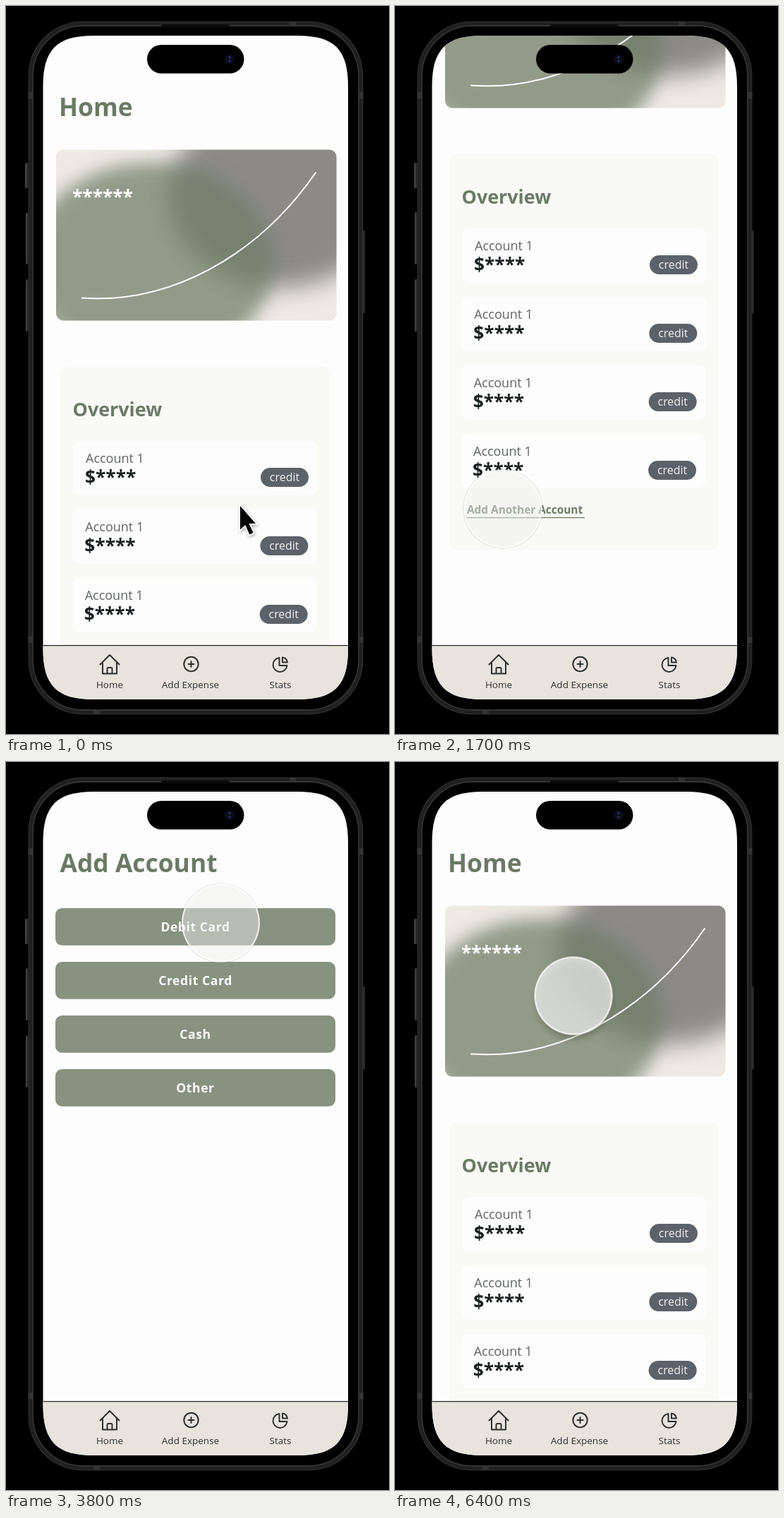
An HTML page for the animation above (6.5 s loop, 543 by 1031 pixels).

```html
<!DOCTYPE html>
<html lang="en">
<head>
<meta charset="utf-8">
<title>Budget app walkthrough</title>
<style>
  html, body { margin: 0; width: 100%; height: 100%; overflow: hidden; background: #000; }
  #stage { position: relative; width: 543px; height: 1031px; overflow: hidden; }
  svg { position: absolute; left: 0; top: 0; font-family: "Open Sans", "Noto Sans", sans-serif; }
  svg, .touch { --loop: 6.5s; }

  .title { font-size: 35.4px; font-weight: 700; fill: #6b7a66; }
  .heading { font-size: 26.9px; font-weight: 700; fill: #6b7a66; }
  .stars { font-size: 26.3px; font-weight: 700; }
  .name { font-size: 18px; fill: #606263; }
  .tag { font-size: 16px; fill: #f0f0f0; text-anchor: middle; }
  .link { font-size: 15.4px; font-weight: 700; fill: #6b7a66; }
  .option { font-size: 17.5px; font-weight: 700; letter-spacing: .6px; fill: #fdfdfd; text-anchor: middle; }
  .nav text { font-size: 13.5px; fill: #2f302f; text-anchor: middle; }
  .icon { fill: none; stroke: #2f302f; stroke-width: 2; stroke-linecap: round; stroke-linejoin: round; }

  .scroll { animation: scroll var(--loop) infinite; }
  .home { animation: home var(--loop) step-end infinite; }
  .add { animation: add var(--loop) step-end infinite; }
  .arrow { animation: arrow var(--loop) step-end infinite; }
  .touch {
    position: absolute; left: -55.5px; top: -55.5px; width: 111px; height: 111px;
    box-sizing: border-box; border: 2px solid rgba(255,255,255,.85); border-radius: 50%;
    animation: path var(--loop) infinite, press var(--loop) infinite, show var(--loop) step-end infinite;
  }

  @keyframes scroll {
    0%, 1.54% { transform: none; animation-timing-function: ease-in-out; }
    14.95%, 84.6% { transform: translateY(-301px); animation-timing-function: ease-in-out; }
    97%, 100% { transform: none; }
  }
  @keyframes home { 0% { visibility: visible; } 29.2% { visibility: hidden; } 76.5% { visibility: visible; } }
  @keyframes add { 0% { visibility: hidden; } 29.2% { visibility: visible; } 76.5% { visibility: hidden; } }
  @keyframes arrow { 0% { visibility: visible; } 16.2% { visibility: hidden; } }
  @keyframes show { 0% { visibility: hidden; } 16.2% { visibility: visible; } }
  @keyframes path {
    0%, 16.2% { transform: translate(331px, 706px); animation-timing-function: ease-in-out; }
    23.1%, 27.7% { transform: translate(152.5px, 711.5px); animation-timing-function: ease-in-out; }
    32.3% { transform: translate(161px, 711px); animation-timing-function: ease-in; }
    41.5% { transform: translate(255px, 602px); animation-timing-function: ease-in-out; }
    51% { transform: translate(360px, 170px); animation-timing-function: ease-in-out; }
    57%, 60% { transform: translate(304px, 227.5px); animation-timing-function: ease-in-out; }
    76.5% { transform: translate(320px, 620px); animation-timing-function: ease-out; }
    81.54% { transform: translate(319px, 575.5px); animation-timing-function: ease-in-out; }
    98.46%, 100% { transform: translate(252.5px, 330.5px); }
  }
  @keyframes press {
    0%, 23.1%, 30.5%, 55%, 61.5%, 100% {
      background: rgba(236,236,235,.72);
      box-shadow: 0 0 0 .6px rgba(90,90,90,.35), 0 9px 9px -3px rgba(50,50,35,.3), inset 0 6px 10px rgba(255,255,255,.18);
    }
    25%, 28.5%, 57.2%, 59.5% {
      background: rgba(238,238,235,.46);
      box-shadow: 0 0 0 .6px rgba(90,90,90,.35), 0 0 0 0 rgba(50,50,35,0), inset 0 0 4px rgba(255,255,255,.15);
    }
  }
</style>
</head>
<body>
<div id="stage">
<svg width="543" height="1031" viewBox="0 0 543 1031">
  <defs>
    <clipPath id="screen">
      <path id="glass" d="M52.5 114C52.5 61.500 72 42 124.500 42H413C465.500 42 485 61.500 485 114V910C485 962.500 465.500 982 413 982H124.500C72 982 52.5 962.500 52.5 910Z"/>
    </clipPath>
    <clipPath id="card"><rect x="71" y="203.5" width="397.5" height="242" rx="10"/></clipPath>
    <filter id="haze" x="-30%" y="-30%" width="160%" height="160%"><feGaussianBlur stdDeviation="17"/></filter>
    <filter id="blur" x="-20%" y="-20%" width="140%" height="140%"><feGaussianBlur stdDeviation="12"/></filter>
    <filter id="drop" x="-50%" y="-50%" width="200%" height="200%">
      <feDropShadow dx="1" dy="2" stdDeviation="2" flood-opacity=".35"/>
    </filter>
    <linearGradient id="key" x2="1" y2="0"><stop stop-color="#4a4a4a"/><stop offset="1" stop-color="#1c1c1c"/></linearGradient>
  </defs>

  <rect width="543" height="1031"/>

  <!-- phone body -->
  <g fill="url(#key)">
    <rect x="27" y="222" width="5" height="36" rx="1.5"/>
    <rect x="28" y="292" width="4" height="74" rx="1.5"/>
    <rect x="28" y="387" width="4" height="74" rx="1.5"/>
    <rect x="505.5" y="318" width="3.5" height="117" rx="1.5"/>
  </g>
  <g fill="none">
    <rect x="34.5" y="24.5" width="469" height="976" rx="74" stroke="#202020" stroke-width="6"/>
    <rect x="32.5" y="22.5" width="473" height="980" rx="76" stroke="#2c2c2c" stroke-width="1.2"/>
    <rect x="38" y="28" width="462" height="969" rx="71" stroke="#343434" stroke-width="1.8"/>
  </g>
  <path fill="#343434" d="M31.5 122h5.5v9h-5.5zM31.5 893h5.5v9h-5.5zM501 122h5.5v9h-5.5zM501 893h5.5v9h-5.5zM402 22h9v5h-9zM124 997.5h9v5h-9z"/>
  <rect x="220" y="26" width="97" height="4.5" rx="2.2" fill="#0b0b0b"/>

  <use href="#glass" fill="#fdfdfd"/>
  <g clip-path="url(#screen)">
    <g class="home">
      <g class="scroll">
        <text class="title" x="75" y="156">Home</text>
        <g clip-path="url(#card)">
          <rect x="71" y="203" width="398" height="243" fill="#eee9e3"/>
          <ellipse cx="388" cy="268" rx="158" ry="131" fill="#8b8a85" filter="url(#haze)"/>
          <ellipse cx="205" cy="364" rx="174" ry="142" fill="#6f7e67" fill-opacity=".72" filter="url(#blur)"/>
        </g>
        <path d="M108 413.5C230 422 355 357 439 236" fill="none" stroke="#fff" stroke-width="2" stroke-linecap="round"/>
        <text class="stars" x="94" y="279" fill="#fff">******</text>

        <rect x="77" y="510.5" width="382" height="561" rx="10" fill="#f9faf5"/>
        <text class="heading" x="94.5" y="580.5">Overview</text>
        <g id="accounts"></g>
        <text class="link" x="102" y="1020">Add Another Account</text>
        <path d="M100 1025.7H269" stroke="#6b7a66" stroke-width="1.2"/>
      </g>
    </g>

    <g class="add">
      <text class="title" x="76.5" y="156">Add Account</text>
      <g id="options"></g>
    </g>

    <g class="nav">
      <rect x="52" y="905.5" width="434" height="77" fill="#e8e3dd"/>
      <path d="M52 905.6H486" stroke="#2b2b2b" stroke-width="1.3"/>
      <g class="icon">
        <path d="M133.5 932.5L147 919L160.5 932.5M137 929.5V945.5H157V929.5M143.5 945V938.5Q143.5 937 145 937H149Q150.5 937 150.5 938.5V945"/>
        <circle cx="262.5" cy="932" r="10.2"/>
        <path d="M258.5 932h8M262.5 928v8"/>
        <path d="M387.5 923A10 10 0 1 0 398.5 934H387.5ZM392 922.5V929.5H399A7.5 7.5 0 0 0 392 922.5Z"/>
      </g>
      <text x="147" y="966">Home</text>
      <text x="261.5" y="965.5">Add Expense</text>
      <text x="389" y="966">Stats</text>
    </g>
  </g>

  <rect x="200" y="55" width="137.5" height="40.5" rx="20.2"/>
  <circle cx="317" cy="75.5" r="7" fill="#0b0c18"/>
  <g fill="#27357f"><circle cx="317" cy="72.5" r="1.5"/><circle cx="317" cy="78" r="1.5"/></g>

  <path class="arrow" d="M332 708V741.5L339.3 735L345.3 748.5L350.5 746L344.5 733H354Z" stroke="#fff" stroke-width="3" paint-order="stroke" filter="url(#drop)"/>
</svg>
<div class="touch"></div>
</div>

<script>
  const fill = (id, items, draw) => {
    document.getElementById(id).innerHTML = items.map(draw).join("");
  };

  fill("accounts", [1, 1, 1, 1], (number, i) => `
    <g transform="translate(${-0.65 * i} ${97 * i})">
      <rect x="95.5" y="616" width="346.5" height="77" rx="10" fill="#fdfdfd"/>
      <text class="name" x="113" y="646.5">Account ${number}</text>
      <text class="stars" x="112" y="676" fill="#1d2021">$****</text>
      <rect x="361" y="654" width="68" height="27" rx="13.5" fill="#5c626a"/>
      <text class="tag" x="395" y="673">credit</text>
    </g>`);

  fill("options", ["Debit Card", "Credit Card", "Cash", "Other"], (label, i) => `
    <g transform="translate(0 ${76 * i})">
      <rect x="70" y="207" width="397" height="52.7" rx="9.5" fill="#879280"/>
      <text class="option" x="268.5" y="239.7">${label}</text>
    </g>`);
</script>
</body>
</html>
```
